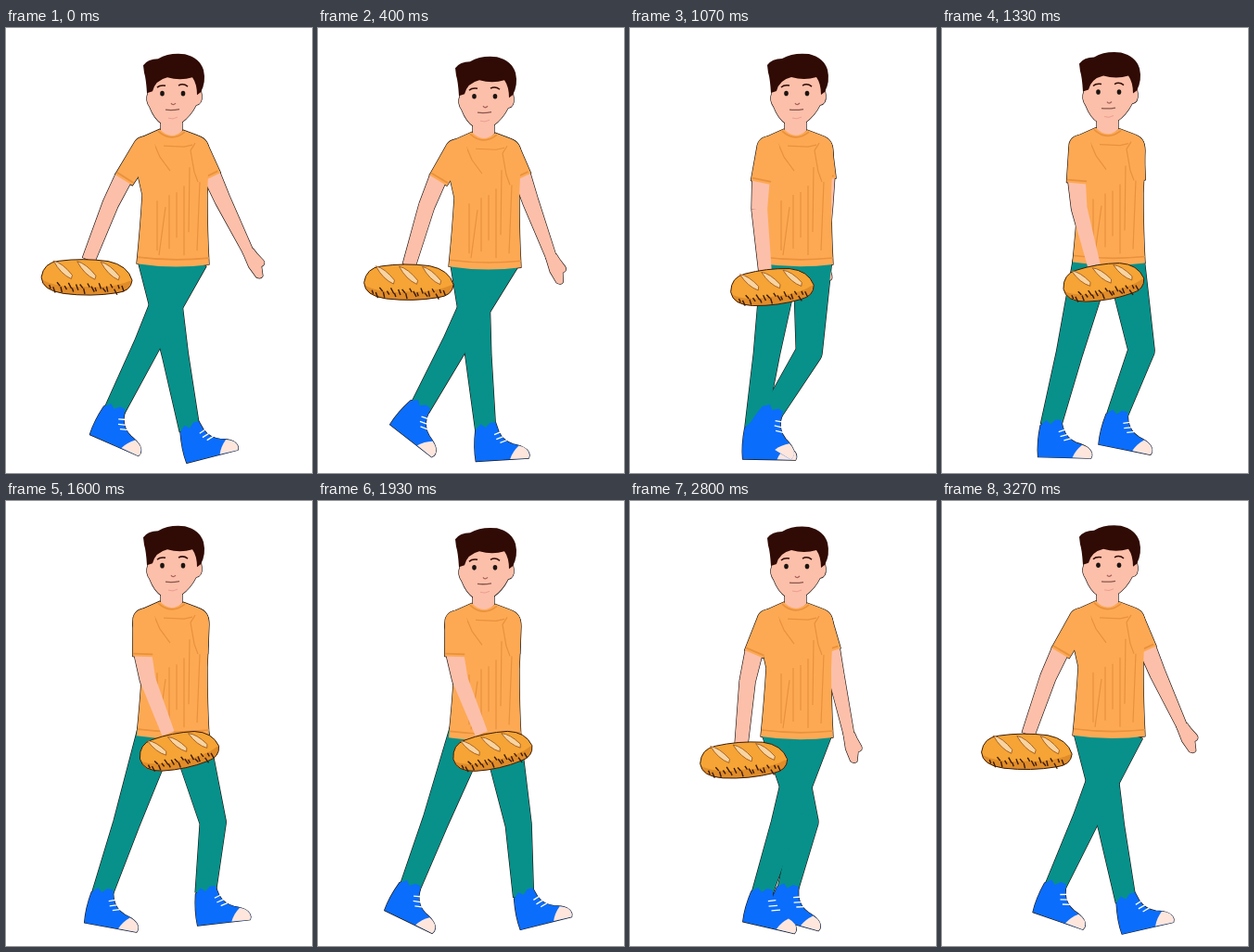
An HTML page with a canvas that plays this animation: 330 px wide and 480 px high, repeating every 3340 ms.

```html
<!DOCTYPE html>
<html lang="en">
<head>
<meta charset="utf-8">
<title>Walking with bread</title>
<style>
html, body { margin: 0; width: 100%; height: 100%; overflow: hidden; background: #fff; }
canvas { display: block; }
</style>
</head>
<body>
<canvas id="stage" width="330" height="480"></canvas>
<script>
const ctx = document.getElementById('stage').getContext('2d');
const LOOP = 3340, STRIDE = 3470, FRAME = LOOP / 50;
const SKIN = '#fcbfaa', SHIRT = '#fda954', SEAM = '#e9913c', PANTS = '#07918a',
      SHOE = '#0b6dfb', TOE = '#fee6dc', HAIR = '#300b05', INK = '#1c1512';
const THIGH = 96, SHIN = 75, HIP_Y = 255;

const SHAPES = {
  shoe: 'M-11 3L-5 -3L0 1L5 -4L11 -4L14 6Q18 16 29 20Q46 24 46 33L45 36L-12 37Q-14 22 -11 3Z',
  toe: 'M35 22Q46 25 46 33L45 36L25 36Q28 28 35 22Z',
  laces: 'M9 9L17 6M11 14L20 11M15 18L24 15',
  hand: 'M-6 -3L-5 14L-1 27Q3 31 6 28L8 18Q14 17 12 12L8 3L6 -3Z',
  neck: 'M167 94L167 111Q178 124 190 111L190 94Z',
  face: 'M153 48L153 70Q150 78 155 85Q160 98 168 103Q178 109 189 102Q199 95 205 83Q212 82 211 72L207 48Z',
  hair: 'M148 40Q153 33 164 33Q176 26 193 28Q209 32 213 45Q216 58 210 69L206 72Q206 60 201 53' +
    'Q188 57 174 53Q161 56 158 68L152 70Q151 54 149 48Z',
  brows: 'M163 64Q166 61 172 62M186 62Q191 59 196 63',
  nose: 'M178 81Q180 84 183 81',
  mouth: 'M172 88Q179 89 187 87.5',
  chin: 'M175 97Q180 99 185 96',
  torso: 'M166 109Q178 122 191 110L207 116Q219 120 219 134L217 180Q217 220 219 255' +
    'Q180 260 141 254Q145 215 147 180L137 135Q137 121 148 117Z',
  collar: 'M164 111Q178 124 193 112',
  hem: 'M142 247Q180 252 219 248',
  folds: 'M160 125L166 139L177 154M170 127L192 128L201 126M204 124L199 132L203 155L207 166' +
    'M163 186V240M172 193L165 245M176 180V238M184 177V226M192 170V245M198 150L197 220M209 166L206 240',
  loaf: 'M-50 1Q-48 -15 -31 -17Q-5 -21 23 -18Q45 -14 50 2Q49 14 33 16Q5 21 -25 18Q-49 15 -50 1Z',
  crust: 'M-49 4Q-30 13 0 10Q30 11 49 2Q49 14 33 16Q5 21 -25 18Q-48 15 -49 4Z',
  cut: 'M-11 -9Q-1 -7 10 6L9 10Q-3 5 -11 -9Z'
};

// Mean plus first and second harmonic of the stride
function wave(angle, mean, amp, lag, amp2 = 0, lag2 = 0) {
  return mean + amp * Math.cos(angle - lag) + amp2 * Math.cos(2 * angle - lag2);
}

// Tapered limb through points [x, y, half width]
function limb(...pts) {
  const path = new Path2D();
  pts.forEach(([x, y, w], i) => {
    if (i && i < pts.length - 1) {
      path.moveTo(x + w, y);
      path.arc(x, y, w, 0, 7);
    }
    if (!i) return;
    const [px, py, pw] = pts[i - 1], len = Math.hypot(x - px, y - py);
    const nx = (py - y) / len, ny = (x - px) / len;
    path.moveTo(px + nx * pw, py + ny * pw);
    path.lineTo(px - nx * pw, py - ny * pw);
    path.lineTo(x - nx * w, y - ny * w);
    path.lineTo(x + nx * w, y + ny * w);
    path.closePath();
  });
  return path;
}

// Trouser leg whose knee follows from hip and ankle
function leg(hip, foot) {
  const dx = foot.x - hip, dy = foot.y - HIP_Y, dist = Math.hypot(dx, dy);
  const along = dist < THIGH + SHIN
    ? (THIGH ** 2 - SHIN ** 2 + dist ** 2) / (2 * dist)
    : dist * THIGH / (THIGH + SHIN);
  const bend = .8 * Math.sqrt(Math.max(0, THIGH ** 2 - along ** 2));
  const kx = hip + (dx * along + dy * bend) / dist;
  const ky = HIP_Y + (dy * along - dx * bend) / dist;
  return limb([hip, HIP_Y - 7, 21], [kx, ky, 14], [foot.x, foot.y + 3, 11]);
}

function place(d, x, y, deg = 0, sx = 1) {
  const path = new Path2D();
  path.addPath(new Path2D(d), new DOMMatrix().translate(x, y).rotate(deg).scale(sx, 1));
  return path;
}

function line(path, color, width = 1) {
  ctx.strokeStyle = color;
  ctx.lineWidth = width;
  ctx.stroke(path);
}

function fill(path, color) {
  ctx.fillStyle = color;
  ctx.fill(path);
}

function drawBread(x, y, deg, size) {
  const part = d => place(d, x, y, deg, size);
  fill(part(SHAPES.loaf), '#f5a435');
  fill(part(SHAPES.crust), '#e08c2a');
  line(part(SHAPES.loaf), '#3b1b08', 1);
  const turn = new DOMMatrix().translate(x, y).rotate(deg).scale(size, 1);
  for (let i = -1; i < 2; i++) {
    const cut = new Path2D();
    cut.addPath(new Path2D(SHAPES.cut), turn.translate(i * 26, -8));
    fill(cut, '#f8d4a2');
    line(cut, '#a05a1d', .9);
  }
  let marks = '';
  for (let i = 0; i < 20; i++) {
    const mx = -41 + i * 4.2, my = 9 + 3 * Math.sin(i * 2.3);
    marks += `M${mx} ${my}l${1.5 + i % 3} ${4 + i % 2 * 2}`;
  }
  line(part(marks), '#3b1b08', 1.4);
}

function drawShoe({ x, y, deg }) {
  fill(place(SHAPES.shoe, x, y, deg), SHOE);
  fill(place(SHAPES.toe, x, y, deg), TOE);
  line(place(SHAPES.laces, x, y, deg), '#fff', 1.3);
}

function drawHead(bob) {
  const part = name => place(SHAPES[name], 0, bob);
  fill(part('neck'), SKIN);
  fill(part('face'), SKIN);
  fill(part('hair'), HAIR);
  line(part('brows'), HAIR, 1.5);
  line(part('nose'), '#a9605a', 1.3);
  line(part('mouth'), '#8a554c', 1.3);
  line(part('chin'), '#ee9d91');
  for (const x of [168.5, 191]) {
    ctx.beginPath();
    ctx.ellipse(x, 70.5 + bob, 2.3, 2.8, 0, 0, 7);
    ctx.fillStyle = INK;
    ctx.fill();
  }
}

// Stitched band just above the sleeve opening
function cuff(sx, sy, { x, y }, w) {
  const len = Math.hypot(x - sx, y - sy), dx = (x - sx) / len, dy = (y - sy) / len;
  const cx = x - dx * 3, cy = y - dy * 3;
  line(new Path2D(`M${cx - dy * w} ${cy + dx * w}L${cx + dy * w} ${cy - dx * w}`), SEAM, 1.8);
}

function draw(t) {
  const a = t / STRIDE * 2 * Math.PI, b = a + Math.PI;
  const swing = Math.cos(a), sway = Math.cos(2 * a);
  const bob = wave(a, 1, 0, 0, 2.5, 1.92), top = 129 + bob;

  const footL = {
    x: wave(a, 149, 49, 0, 5, -1.57),
    y: wave(a, 422, 11, .94, 3.6, -.97),
    deg: wave(a, 10, -21, .71, 12, 2.23)
  };
  const footR = {
    x: wave(b, 157, 54, .26, 12),
    y: wave(b, 416, 9.6, .89),
    deg: wave(b, 16, -24, .74, -9)
  };
  const feet = [footL, footR];
  const endL = { x: 137.5 - 10.5 * swing, y: 166 - 2 * swing };
  const endR = { x: 214 + 7.5 * swing, y: 163 - 2 * swing };
  const wristL = { x: wave(a, 133, -44, .07), y: 257 - 7 * sway };
  const wristR = { x: 222 + 40 * swing, y: 249 - 6 * sway };

  const shoulder = (x, end) => limb([x, top - 6, 9], [x, top, 12], [end.x, end.y, 11]);
  const forearm = (end, wrist, bow, w) => limb([end.x, end.y - 3, 9.5],
    [end.x * .7 + wrist.x * .3 + bow, end.y * .7 + wrist.y * .3, 8.5], [wrist.x, wrist.y, w]);
  const tilt = Math.atan2(wristR.y - endR.y, wristR.x - endR.x) * 180 / Math.PI - 83;

  const armR = forearm(endR, wristR, 0, 5.5), armL = forearm(endL, wristL, -3, 7);
  const hand = place(SHAPES.hand, wristR.x, wristR.y, tilt);
  const pants = [leg(163, footL), leg(197, footR)];
  const torso = place(SHAPES.torso, 0, bob);
  const sleeveR = shoulder(206, endR), sleeveL = shoulder(149, endL);
  const outline = [armR, hand, ...pants, torso, sleeveR, sleeveL, armL,
    place(SHAPES.neck, 0, bob), place(SHAPES.face, 0, bob),
    ...feet.map(f => place(SHAPES.shoe, f.x, f.y, f.deg))];

  ctx.fillStyle = '#fff';
  ctx.fillRect(0, 0, 330, 480);
  ctx.lineJoin = 'round';
  outline.forEach(p => line(p, INK, 1.3));

  fill(armR, SKIN);
  fill(hand, SKIN);
  pants.forEach(p => fill(p, PANTS));
  feet.forEach(drawShoe);
  drawHead(bob);
  fill(sleeveR, SHIRT);
  cuff(206, top, endR, 9);
  fill(torso, SHIRT);
  line(place(SHAPES.collar, 0, bob), SEAM, 1.6);
  line(place(SHAPES.hem, 0, bob), SEAM, 1.6);
  line(place(SHAPES.folds, 0, bob), SEAM, 1.2);
  fill(armL, SKIN);
  fill(sleeveL, SHIRT);
  cuff(149, top, endL, 10.5);
  drawBread(wristL.x + 5 - 7 * swing, wristL.y + 18 + sway, wave(a, -4.5, 6, .2), .92 + .06 * swing);
}

function tick() {
  // Frame starts are rounded to 10 ms, so allow for that
  const step = Math.floor((performance.now() % LOOP + 6) / FRAME);
  draw(step * FRAME);
  requestAnimationFrame(tick);
}
tick();
</script>
</body>
</html>
```
